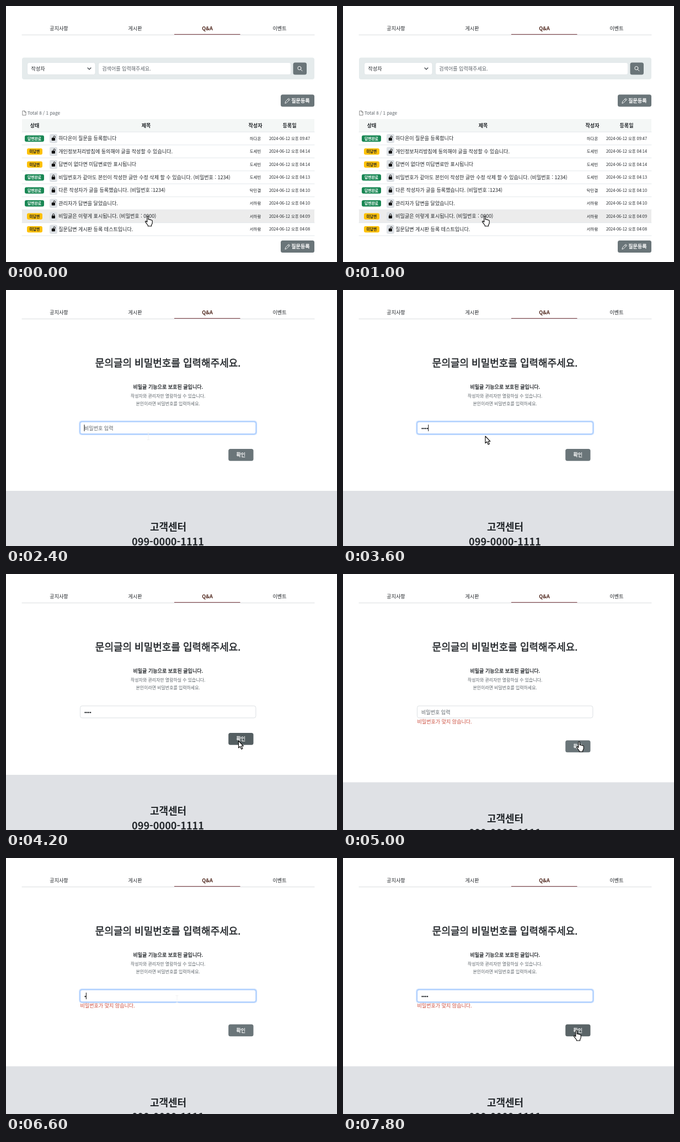
Write an HTML page that moves like this. It is 600 px wide and 464 px high and loops after 8000 ms.

```html
<!DOCTYPE html>
<html lang="ko">
<head>
<meta charset="utf-8">
<title>Q&amp;A</title>
<style>
html, body { margin: 0; width: 100%; height: 100%; overflow: hidden; background: #fff; }
svg { display: block; width: 100%; height: 100%; font-family: "Noto Sans CJK KR", "Noto Sans CJK", "Noto Sans KR", sans-serif; }
.line { fill: none; stroke-linecap: round; stroke-linejoin: round; }
.pointer { fill: #fff; stroke: #000; stroke-width: 1.1; stroke-linejoin: round; }
.medium { stroke: currentColor; stroke-width: .028em; }
</style>
</head>
<body>
<svg id="stage" viewBox="0 0 600 464"></svg>
<script>
const INK = '#212529', GREY = '#6a7579', RULE = '#dee2e6';

// Text placed by its visual middle; a fine outline gives the medium weight
const text = (x, cy, str, { size = 9.05, weight = 400, fill = INK, anchor = 'middle' } = {}) => {
  const medium = weight === 500 ? `class="medium" color="${fill}"` : '';
  return `<text x="${x}" y="${cy + size * 0.38}" font-size="${size}" font-weight="${medium ? 400 : weight}" fill="${fill}" text-anchor="${anchor}" ${medium}>${str}</text>`;
};
const left = (x, cy, str, opts) => text(x, cy, str, { ...opts, anchor: 'start' });
const box = (x, y, w, h, fill, r = 0, extra = '') =>
  `<rect x="${x}" y="${y}" width="${w}" height="${h}" rx="${r}" fill="${fill}" ${extra}/>`;
const line = (d, stroke, width = 0.8, extra = '') =>
  `<path class="line" d="${d}" stroke="${stroke}" stroke-width="${width}" ${extra}/>`;
const group = (id, body) => `<g id="${id}">${body}</g>`;
const edge = `stroke="${RULE}" stroke-width=".8"`;

function tabs() {
  const names = [[96, '공지사항'], [234, '게시판'], [496, '이벤트']];
  return line('M29 52.4H559', '#d6d9dc', 0.9)
    + names.map(([x, name]) => text(x, 40.5, name)).join('')
    + `<g id="activeTab">${text(365, 40.5, 'Q&amp;A', { weight: 700, fill: 'currentColor' })}</g>`
    + '<path id="tabLine" d="M305 51.4H424.5" stroke-width="1"/>';
}

function registerButton(y) {
  return box(498, y, 61, 22, GREY, 3.5)
    + line(`M506 ${y + 15.5}l.8-3 5.7-5.7 2.1 2.1-5.7 5.7zM511 ${y + 8.3}l2.1 2.1`, '#fff', 0.9)
    + left(517.3, y + 11, '질문등록', { weight: 500, fill: '#fff' });
}

function lock(y, closed) {
  const shackle = closed ? 'M84.3 -1V-2.6a1.7 1.7 0 0 1 3.4 0V-1' : 'M86 -1V-2.8a1.6 1.6 0 0 1 3.2 0V-1.6';
  return `<g transform="translate(0 ${y})">${box(79, -8, 14, 16.5, RULE, 3)}`
    + line(shackle, '#111', 1) + box(82.8, -1.2, 6.2, 5.2, '#111', 1) + '</g>';
}

function row([title, name, time, answered, closed], i) {
  const y = 240 + i * 23.5;
  const badge = answered
    ? box(34, y - 5.5, 35, 11.6, '#198754', 3) + text(51.6, y + 0.3, '답변완료', { size: 6.8, weight: 700, fill: '#fff' })
    : box(38, y - 5.5, 28, 11.6, '#ffc107', 3) + text(52, y + 0.3, '미답변', { size: 6.8, weight: 700 });
  const hovered = i === 6 ? box(29, y - 11.7, 530, 23.4, '#ececec') : '';
  return hovered + line(`M29 ${y + 11.8}H559`, RULE) + badge + lock(y, closed)
    + left(95.3, y, title) + text(452, y, name, { size: 7.4 })
    + text(514, y, `2024-06-12 오후 ${time}`, { size: 7.4 });
}

function listPage() {
  const rows = [
    ['하다온이 질문을 등록합니다', '하다온', '09:47', 1, 0],
    ['개인정보처리방침에 동의해야 글을 작성할 수 있습니다.', '도세빈', '04:14', 0, 0],
    ['답변이 없다면 미답변로만 표시됩니다', '도세빈', '04:14', 0, 0],
    ['비밀번호가 같아도 본인이 작성한 글만 수정 삭제 할 수 있습니다. (비밀번호 : 1234)', '도세빈', '04:13', 1, 1],
    ['다른 작성자가 글을 등록했습니다. (비밀번호 :1234)', '탁민결', '04:10', 1, 1],
    ['관리자가 답변을 달았습니다.', '서하람', '04:10', 1, 0],
    ['비밀글은 이렇게 표시됩니다. (비밀번호 : 0000)', '서하람', '04:09', 0, 1],
    ['질문답변 게시판 등록 테스트입니다.', '서하람', '04:08', 0, 0]
  ];
  const heads = [[52, '상태'], [254, '제목'], [452, '작성자'], [514, '등록일']];
  return box(29, 93.5, 530, 39.5, '#e5ebec', 4)
    + box(38.5, 102.5, 123.5, 22, '#fff', 3.5, edge) + left(45.5, 113.5, '작성자')
    + line('M148 112l3 3 3-3', '#343a40', 1.1)
    + box(167.5, 102.5, 349, 22, '#fff', 3.5, edge)
    + left(174.3, 113.5, '검색어를 입력해주세요.', { fill: '#5c6369' })
    + box(520.5, 102.5, 24.5, 22, GREY, 3.5)
    + line('M535 112.6a3.1 3.1 0 1 1-6.2 0a3.1 3.1 0 1 1 6.2 0M534.2 115l2.8 2.8', '#fff', 1)
    + registerButton(160.5)
    + line('M30.3 190.2h3.5l2.2 2.2v5.6h-5.7zM33.8 190.2v2.2h2.2', '#555', 0.7)
    + left(39, 194.3, 'Total 8 / 1 page', { size: 8.2, fill: '#5c6369' })
    + box(29, 205, 530, 23, '#f4f7f6') + line('M29 228.3H559', RULE)
    + heads.map(([x, name]) => text(x, 216.3, name, { weight: 700 })).join('')
    + rows.map(row).join('') + registerButton(425);
}

function passwordPage() {
  const dots = [0, 1, 2, 3].map(i => `<circle class="dot" cx="${143.6 + i * 3.15}" cy="251" r="1.25" fill="${INK}"/>`).join('');
  return text(293.6, 132, '문의글의 비밀번호를 입력해주세요.', { size: 18, weight: 500 })
    + text(293.8, 175.2, '비밀글 기능으로 보호된 글입니다.', { weight: 500 })
    + text(293.6, 192, '작성자와 관리자만 열람하실 수 있습니다.', { size: 7.95, fill: '#5f666c' })
    + text(293.6, 205.8, '본인이라면 비밀번호를 입력하세요.', { size: 7.95, fill: '#5f666c' })
    + group('ring', box(132.3, 236.8, 322.8, 26.2, '#c2dbfe', 5))
    + box(134.5, 239, 318.4, 21.8, '#fff', 3.5, 'id="field" stroke-width=".8"')
    + group('hint', left(142, 250.3, '비밀번호 입력', { fill: '#5c6369' }))
    + dots + '<path id="caret" stroke="#111" stroke-width="1"/>'
    + group('error', left(134.5, 268, '비밀번호가 맞지 않습니다.', { fill: '#cb4a3a' }))
    + group('lower', box(403.2, 288, 45.3, 21.8, GREY, 3.5, 'id="confirm"')
      + text(425.8, 299, '확인', { weight: 500, fill: '#fff' })
      + box(0, 364, 600, 120, '#dfe1e5')
      + text(294, 429.3, '고객센터', { size: 18, weight: 700 })
      + text(293.5, 456, '099-0000-1111', { size: 18.1, weight: 700 }));
}

const cursors = {
  arrow: '<path class="pointer" d="M0 0V12.6L3 10L5.2 15L7.4 14L5.3 9.3H9Z"/>',
  hand: '<path class="pointer" d="M-1.2 1.5q1.2-1.6 2.4 0V7q2-.8 2.4.4 2-.6 2.4.6 2-.2 2.2 1.2V14l-1.6 3v2H.3v-1.5L-4.4 11.4q-.4-2 1.4-1.4l1.8 1.5Z"/>',
  beam: line('M-2 -6.5H2M0 -6.5V6.5M-2 6.5H2', '#f0f1f3', 0.9)
};

document.getElementById('stage').innerHTML = tabs() + group('list', listPage()) + group('password', passwordPage())
  + Object.entries(cursors).map(([id, body]) => group(id, body)).join('');

const $ = id => document.getElementById(id);
const show = (el, on) => el.setAttribute('display', on ? 'inline' : 'none');
const dots = document.querySelectorAll('.dot');

// Pointer stops: time, x, y, shape shown from then on
const stops = [
  [0, 257, 380, 'hand'], [1000, 257, 380, 'hand'], [1200, 251, 381, 'arrow'], [1400, 251, 381, 'arrow'],
  [2000, 258, 265, 'beam'], [3600, 258, 265, 'arrow'], [4200, 421.5, 302.5, 'arrow'],
  [4800, 428, 303, 'hand'], [5200, 428, 303, 'arrow'], [5800, 310, 256, 'beam'],
  [7200, 310, 256, 'arrow'], [7800, 423, 312, 'hand'], [8000, 423, 312, 'hand']
];

function movePointer(t) {
  const i = stops.findIndex((s, n) => t < stops[n + 1][0]);
  const [t0, x0, y0, shape] = stops[i], [t1, x1, y1] = stops[i + 1];
  const p = (t - t0) / (t1 - t0), k = p * p * (3 - 2 * p);
  for (const id in cursors) show($(id), id === shape);
  $(shape).setAttribute('transform', `translate(${x0 + (x1 - x0) * k} ${y0 + (y1 - y0) * k})`);
}

const within = (t, a, b) => t >= a && t < b;
const typed = (t, start) => Math.max(0, Math.min(4, Math.floor((t - start) / 200) + 1));

function draw(now) {
  const t = Math.floor((now % 8000) / 200) * 200;
  const onList = t < 1200, failed = t >= 4600;
  const count = failed ? typed(t, 6600) : typed(t, 2800);
  const focused = within(t, 2200, 4200) || t >= 6000;
  const fresh = t === 1200 || t === 4600;

  show($('list'), onList);
  show($('password'), !onList);
  $('activeTab').style.color = fresh ? INK : '#4f261c';
  $('tabLine').setAttribute('stroke', fresh ? '#b3b1b4' : '#74343a');

  show($('ring'), focused);
  $('field').setAttribute('stroke', focused ? '#86b7fe' : '#d4d8dc');
  show($('hint'), count === 0);
  dots.forEach((dot, i) => show(dot, i < count));
  const caretX = count ? 142.2 + count * 3.15 : 142;
  $('caret').setAttribute('d', `M${caretX} 244V256`);
  const typing = count > 0 && count < 4;
  const blinkFrom = failed ? 7200 : 2200;
  show($('caret'), focused && (typing || Math.abs(t - blinkFrom) % 1000 < 500));

  show($('error'), failed);
  $('lower').setAttribute('transform', `translate(0 ${failed ? 13.5 : 0})`);
  const pressed = within(t, 4200, 4600), hovered = t === 4000 || t >= 7800;
  $('confirm').setAttribute('fill', pressed ? '#545e61' : hovered ? '#5a6467' : GREY);
  movePointer(t);
}

const start = performance.now();
function tick() {
  draw(performance.now() - start);
  requestAnimationFrame(tick);
}
tick();
</script>
</body>
</html>
```
